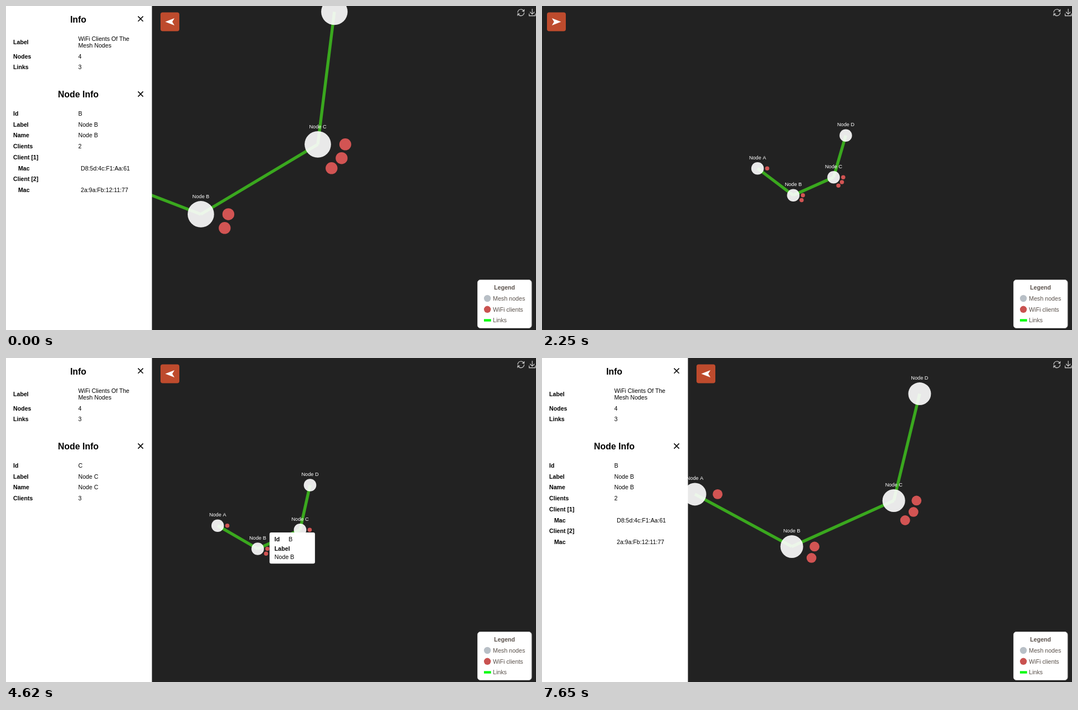
Write an HTML page with a canvas that moves like this. It is 957x585 px and loops after 7680 ms.

```html
<!DOCTYPE html>
<html lang="en">
<head>
<meta charset="utf-8">
<title>Mesh graph</title>
<style>
html, body { margin: 0; width: 100%; height: 100%; overflow: hidden; background: #222; }
canvas { display: block; }
</style>
</head>
<body>
<canvas id="stage" width="957" height="585"></canvas>
<script>
const W = 957, H = 585, LOOP = 7680, STEP = 30;
const RELOAD = 1740, READY = 1980, HOVER_C = 3540, OPEN = 3810, HOVER_B = 4450;
const ZOOM_START = 4890, ZOOM_GAP = 54, SELECT_B = 5850, LEAVE_B = 6150;
const PANEL_W = 263.5, TEXT = 10.65;
const PIVOT = [456, 348];
const NAMES = ['A', 'B', 'C', 'D'];
const CLIENTS = [1, 2, 3, 0];
const MACS = ['D8:5d:4c:F1:Aa:61', '2a:9a:Fb:12:11:77'];

// Unzoomed layout: x, y of nodes A to D at each time
const START = [342.1, 328, 419.5, 357.8, 493.5, 313.6, 504, 229.7];
const LAYOUT = [
  [READY, [393, 286, 452, 338, 522, 308, 549, 238]],
  [2250, [389.2, 293.2, 453.7, 341.8, 526.5, 309.2, 548.5, 233.8]],
  [3900, [383.8, 301.3, 454.5, 344.2, 530.5, 310.5, 548, 230.5]],
  [4620, [382.2, 302.7, 454.5, 344.5, 531, 310.2, 549, 229.5]],
  [5460, [381.4, 303.7, 454.3, 344.6, 531.5, 309.8, 550.4, 228.6]],
  [7650, [379.7, 304.7, 453.9, 344.8, 532, 309.6, 551.8, 227.8]]
];

const ctx = document.getElementById('stage').getContext('2d');
const clamp = (v, a = 0, b = 1) => Math.min(b, Math.max(a, v));
const mix = (a, b, k) => a + (b - a) * k;
const progress = (t, start, length) => clamp((t - start) / length);
const outQuart = k => 1 - (1 - k) ** 4;

// CSS "ease": cubic-bezier(.25, .1, .25, 1)
function ease(x) {
  let lo = 0, hi = 1;
  for (let i = 0; i < 20; i++) {
    const s = (lo + hi) / 2;
    const bx = 0.75 * s * (1 - s) + s ** 3;
    if (bx < x) lo = s; else hi = s;
  }
  return 0.3 * lo * (1 - lo) ** 2 + 3 * lo * lo * (1 - lo) + lo ** 3;
}

function text(str, x, y, { size = TEXT, bold = false, align = 'left', color = '#000' } = {}) {
  ctx.font = `${bold ? 'bold ' : ''}${size}px "Liberation Sans", Arial, sans-serif`;
  ctx.textAlign = align;
  ctx.fillStyle = color;
  ctx.fillText(str, x, y + size * 0.358);
}

function disc(x, y, r, color) {
  ctx.fillStyle = color;
  ctx.beginPath();
  ctx.arc(x, y, r, 0, Math.PI * 2);
  ctx.fill();
}

function box(x, y, w, h, r, color) {
  ctx.fillStyle = color;
  ctx.beginPath();
  ctx.roundRect(x, y, w, h, r);
  ctx.fill();
}

function line(points, color, width) {
  ctx.strokeStyle = color;
  ctx.lineWidth = width;
  ctx.beginPath();
  points.forEach(([x, y]) => ctx.lineTo(x, y));
  ctx.stroke();
}

function layoutAt(t) {
  if (t < RELOAD) return START;
  let i = 0;
  while (i < LAYOUT.length - 2 && t >= LAYOUT[i + 1][0]) i++;
  const [t0, a] = LAYOUT[i], [t1, b] = LAYOUT[i + 1];
  const k = progress(t, t0, t1 - t0);
  return a.map((v, j) => mix(v, b[j], k));
}

function zoomAt(t) {
  if (t < RELOAD) return 1.1 ** 11;
  return 1.1 ** clamp(Math.floor((t - ZOOM_START) / ZOOM_GAP) + 1, 0, 9);
}

function drawGraph(t) {
  const zoom = zoomAt(t), flat = layoutAt(t);
  const r = 11.3 * (1 + (zoom - 1) * 0.6);
  const nodes = NAMES.map((_, i) =>
    PIVOT.map((p, axis) => p + (flat[i * 2 + axis] - p) * zoom));

  for (let i = 0; i < 3; i++) line([nodes[i], nodes[i + 1]], '#3aa81e', 5.4);
  nodes.forEach(([x, y]) => disc(x, y, r, 'rgba(255,255,255,.9)'));
  nodes.forEach(([x, y], i) => {
    for (let c = 0; c < CLIENTS[i]; c++) {
      const a = c * Math.PI / 6, d = 17.4 * zoom;
      disc(x + d * Math.cos(a), y + d * Math.sin(a), 3.77 * zoom, '#d25453');
    }
    text('Node ' + NAMES[i], x, y - r - 8.5, { size: 9.2, align: 'center', color: '#fff' });
  });
}

function drawTools() {
  ctx.lineCap = 'round';
  for (const a of [0, Math.PI]) {
    ctx.save();
    ctx.translate(929.8, 11.8);
    ctx.rotate(a);
    ctx.strokeStyle = '#ddd';
    ctx.lineWidth = 1.1;
    ctx.beginPath();
    ctx.arc(0, 0, 5.8, Math.PI * 1.02, Math.PI * 1.88);
    ctx.stroke();
    line([[6, -5.4], [5.6, -2.2], [2.4, -2.6]], '#ddd', 1.1);
    ctx.restore();
  }
  line([[950.2, 5.5], [950.2, 14.5]], '#ddd', 1.1);
  line([[946.4, 11], [950.2, 14.8], [954, 11]], '#ddd', 1.1);
  line([[944.6, 14], [944.6, 17.6], [955.8, 17.6], [955.8, 14]], '#ddd', 1.1);
  ctx.lineCap = 'butt';
}

function drawLegend() {
  const color = '#5a514b';
  box(851.5, 494.5, 97.5, 87, 5, '#fff');
  ctx.strokeStyle = '#ccc';
  ctx.lineWidth = 1;
  ctx.stroke();
  text('Legend', 900.2, 508, { bold: true, align: 'center', color });
  disc(869.2, 528, 6.2, '#b8bfc6');
  disc(869.2, 547.8, 6.2, '#c95250');
  box(863, 565.3, 12.8, 4.4, 0, '#05fb10');
  ['Mesh nodes', 'WiFi clients', 'Links'].forEach((s, i) =>
    text(s, 879.3, 528 + i * 19.7, { color }));
}

function drawClose(x, y) {
  const d = 4.6;
  line([[x - d, y - d], [x + d, y + d]], '#000', 1.5);
  line([[x - d, y + d], [x + d, y - d]], '#000', 1.5);
}

function drawPanel(node, k) {
  if (k <= 0) return;
  const clients = CLIENTS[NAMES.indexOf(node)];
  const title = (s, y) => {
    text(s, 130.5, y, { size: 15.9, bold: true, align: 'center' });
    drawClose(243, y - 0.8);
  };
  const row = (key, value, y, indent = 0) => {
    text(key, 13 + indent * 9, y, { bold: true });
    text(value, 130.5 + indent * 4.5, y);
  };

  ctx.save();
  ctx.translate(PANEL_W * (k - 1), 0);
  box(0, 0, PANEL_W, H, 0, '#fff');
  title('Info', 24);
  row('Label', '', 64.8);
  text('WiFi Clients Of The', 130.5, 58.8);
  text('Mesh Nodes', 130.5, 71);
  row('Nodes', '4', 90.7);
  row('Links', '3', 110.5);
  title('Node Info', 159.8);
  row('Id', node, 194);
  row('Label', 'Node ' + node, 213.7);
  row('Name', 'Node ' + node, 233.5);
  row('Clients', clients, 253.3);
  if (node === 'B') {
    MACS.forEach((mac, i) => {
      row(`Client [${i + 1}]`, '', 273 + i * 39.5);
      row('Mac', mac, 292.8 + i * 39.5, 1);
    });
  }
  ctx.restore();
}

function drawHandle(k, open) {
  const x = mix(26, 296, k), y = 28.5, dir = open ? -1 : 1;
  box(x - 17, y - 17, 34, 34, 4, 'rgba(214,82,48,.87)');
  ctx.fillStyle = '#fff';
  ctx.beginPath();
  [[8.4, 0], [-8.2, -6.6], [-4.2, 0], [-8.2, 6.6]].forEach(([px, py]) =>
    ctx.lineTo(x + px * dir, y + py));
  ctx.fill();
}

function drawTooltip(t) {
  if (t < HOVER_C || t >= LEAVE_B + 100) return;
  const k = outQuart(progress(t, HOVER_B, 300));
  const x = mix(549, 473.2, k), y = mix(282.7, 316.2, k);
  const node = t < HOVER_B ? 'C' : 'B';
  ctx.save();
  ctx.globalAlpha = progress(t, HOVER_C - STEP, 100) * (1 - progress(t, LEAVE_B, 100));
  box(x, y, 82, 56.3, 3, '#fff');
  text('Id', x + 9, y + 12.2, { bold: true });
  text(node, x + 34.5, y + 12.2);
  text('Label', x + 9, y + 28.8, { bold: true });
  text('Node ' + node, x + 9, y + 44.2);
  ctx.restore();
}

function drawLoading(t) {
  const turn = Math.floor((t - RELOAD) / 60);
  for (let i = 0; i < 8; i++) {
    const a = (i + turn) * Math.PI / 4 - Math.PI / 2;
    disc(479.5 + 10.8 * Math.cos(a), 274.6 + 10.8 * Math.sin(a), 1 + i * 0.4, '#0a0500');
  }
  text('Loading...', 479.3, 310.6, { size: 13.6, bold: true, align: 'center' });
}

function draw(t) {
  const loading = t >= RELOAD && t < READY;
  const before = t < RELOAD;
  ctx.fillStyle = loading ? '#fff' : '#222';
  ctx.fillRect(0, 0, W, H);
  if (loading) {
    drawLoading(t);
  } else {
    drawGraph(t);
    drawTools();
  }
  drawLegend();
  drawPanel(before || t >= SELECT_B ? 'B' : 'C', before ? 1 : ease(progress(t, OPEN, 240)));
  drawHandle(before ? 1 : ease(progress(t, OPEN, 145)), before || t >= OPEN);
  drawTooltip(t);
}

const origin = performance.now();
function tick() {
  const t = (performance.now() - origin) % LOOP;
  draw(Math.floor(t / STEP) * STEP);
  requestAnimationFrame(tick);
}
tick();
</script>
</body>
</html>
```
